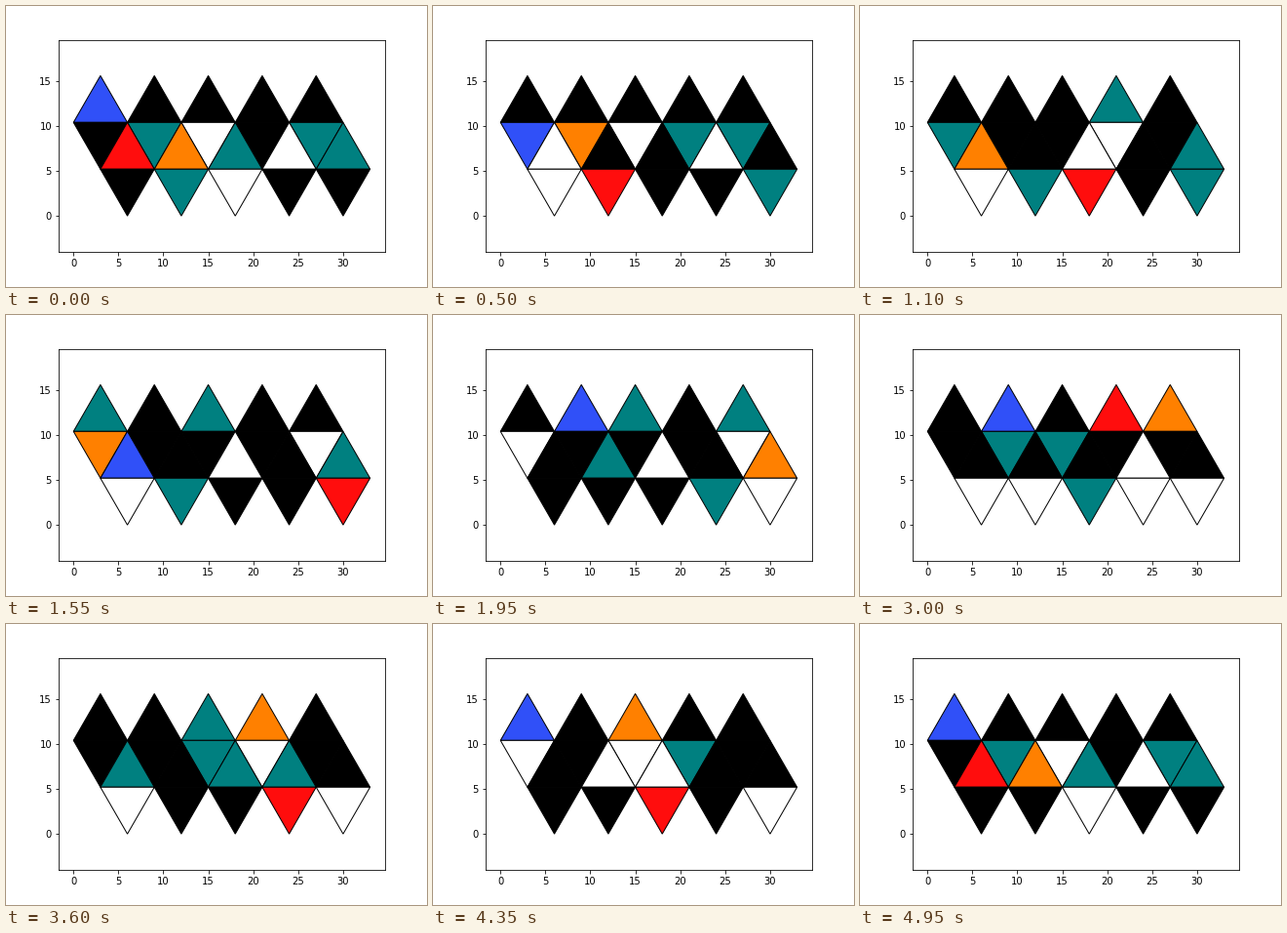
Animation of 432x288 px, one loop 5000 ms. Source, as a matplotlib script:

```python
import random
from itertools import pairwise

import matplotlib.pyplot as plt
from matplotlib.animation import FuncAnimation

FRAMES, INTERVAL = 100, 50
SIDE = 6
H = SIDE * 3 ** 0.5 / 2

BLACK, TEAL, WHITE = "black", "#008080", "white"
BLUE, RED, ORANGE = "#3050f8", "#ff0d0d", "#ff8000"

# Walkers in drawing order, with the cells they pass at the times in STOPS.
STOPS = [0, 22, 39, 50, 72, 87, 99]
WALKERS = [
    (TEAL, "B1 B0 A4 A4 A2 A2 B1"),
    (TEAL, "B4 C4 C4 D4 C2 C2 C2"),
    (TEAL, "C2 A3 A2 B2 B2 B2 B2"),
    (TEAL, "C4 D4 D3 C3 C3 B3 B4"),
    (TEAL, "D1 D1 C1 C1 C0 B0 C4"),
    (WHITE, "B2 C2 C2 D1 D0 B0 C0"),
    (WHITE, "C3 B3 B4 B4 B3 B2 B2"),
    (WHITE, "D2 D0 D4 D3 D3 C2 D2"),
    (WHITE, "C1 D0 D4 C4 D0 C1 C1"),
    (WHITE, "C0 C0 B0 C4 D4 D4 C3"),
    (BLUE, "A0 C0 A1 A1 A3 A0 A0"),
    (RED, "C0 D2 C4 A3 D3 D2 C0"),
    (ORANGE, "C1 C0 C4 B4 A3 A2 C1"),
]


def corners(cell):
    """Triangle of one face in the unfolded icosahedron."""
    row, col = cell[0], int(cell[1])
    x = SIDE * col + (SIDE / 2 if row in "CD" else 0)
    base = 2 * H if row in "AB" else H
    tip = base + (H if row in "AC" else -H)
    return [(x, base), (x + SIDE, base), (x + SIDE / 2, tip)]


def neighbours(cell):
    row, col = cell[0], int(cell[1])
    left, right = (col - 1) % 5, (col + 1) % 5
    return {
        "A": [f"A{left}", f"A{right}", f"B{col}"],
        "B": [f"A{col}", f"C{col}", f"C{left}"],
        "C": [f"B{col}", f"B{right}", f"D{col}"],
        "D": [f"C{col}", f"D{left}", f"D{right}"],
    }[row]


def shortest_path(start, goal):
    """Cells after start up to and including goal."""
    paths = [[start]]
    for path in paths:
        if path[-1] == goal:
            return path[1:]
        paths += [path + [n] for n in neighbours(path[-1]) if n not in path]


def walk():
    """Positions of all walkers in every frame, moved in random turns."""
    rng = random.Random(4)
    routes = [route.split() for _, route in WALKERS]
    pos = [route[0] for route in routes]
    moves = {}
    for leg, (begin, end) in enumerate(pairwise(STOPS)):
        paths = [shortest_path(r[leg], r[leg + 1]) for r in routes]
        turns = [w for w, path in enumerate(paths) for _ in path]
        rng.shuffle(turns)
        spacing = (end - begin - 1) / (len(turns) - 1)
        for i, w in enumerate(turns):
            frame = begin + 1 + round(i * spacing)
            moves.setdefault(frame, []).append((w, paths[w].pop(0)))
    history = []
    for frame in range(FRAMES):
        for w, cell in moves.get(frame, []):
            pos[w] = cell
        history.append(list(pos))
    return history


history = walk()

fig, ax = plt.subplots(figsize=(6, 4), dpi=72)
fig.subplots_adjust(bottom=0.125)
faces = {}
for row in "ABCD":
    for col in range(5):
        cell = f"{row}{col}"
        faces[cell], = ax.fill(*zip(*corners(cell)), facecolor=BLACK,
                               edgecolor="black", linewidth=1)
ax.axis("equal")


def update(frame):
    colors = dict.fromkeys(faces, BLACK)
    for (color, _), cell in zip(WALKERS, history[frame]):
        colors[cell] = color
    for cell, face in faces.items():
        face.set_facecolor(colors[cell])
    return list(faces.values())


anim = FuncAnimation(fig, update, frames=FRAMES, interval=INTERVAL,
                     repeat=True, repeat_delay=0)
plt.show()
```
